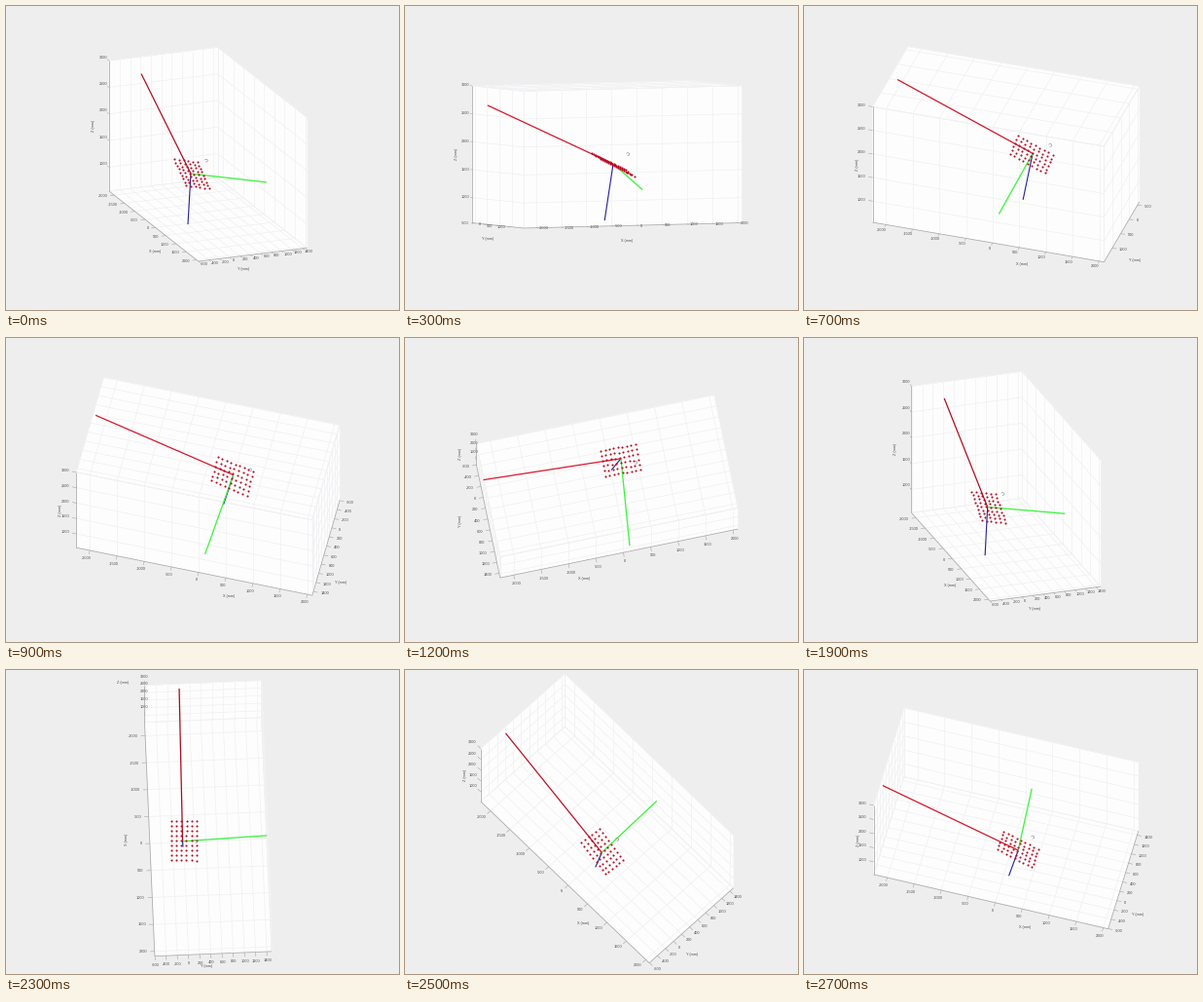
Animation, 404 px wide and 312 px high, one loop 2.8 s. Source, as a matplotlib script:

```python
import numpy as np
import matplotlib.pyplot as plt
from matplotlib.animation import FuncAnimation
from matplotlib.collections import LineCollection
from matplotlib.patches import Arc, Polygon

W, H, DPI = 404, 312, 100
FRAMES, STEP = 28, 100
PX = 72 / DPI                      # points per pixel
SCALE = 0.0575                     # pixels per millimetre
LO = np.array([-2250.0, -605.0, 550.0])
HI = np.array([2090.0, 1485.0, 3000.0])
MID = (LO + HI) / 2
SCREEN_MID = np.array([207.7, 152.2])

# camera drag: time (ms), azimuth, elevation (degrees)
VIEWS = np.array([
    (0, 68.4, 18.1), (700, -17.6, -32.6), (1200, 11.7, -81.2),
    (1500, 30.5, -15.6), (1900, 71.1, 22.6), (2300, 87.6, 74.3),
    (2400, 63, 71), (2700, 15, 59.8),
])

ORIGIN = np.array([271, -30, 1575])
RED_END = np.array([-2250, 15, 2679])
GREEN_END = np.array([117, 1485, 1184])
BLUE_END = np.array([94, -16, 568])
BOARD = np.array([-63, -216, 1768])
BOARD_U = np.array([645, -30, -296]) / 8
BOARD_V = np.array([-5, 450, -111]) / 5
DOTS = np.array([BOARD + i * BOARD_U + j * BOARD_V
                 for i in range(9) for j in range(6)])

INK, EDGE, GRID = "#4c4c4c", "#a9a9a9", "#f1f0f2"


def view_at(ms):
    """Cubic interpolation of azimuth and elevation."""
    t, v = VIEWS[:, 0], VIEWS[:, 1:]
    k = min(np.searchsorted(t, ms, side="right") - 1, len(t) - 2)

    def slope(i):
        a, b = max(i - 1, 0), min(i + 1, len(t) - 1)
        return (v[b] - v[a]) / (t[b] - t[a])

    h = t[k + 1] - t[k]
    u = (ms - t[k]) / h
    ease = u * u * (3 - 2 * u)
    return (v[k] + (v[k + 1] - v[k]) * ease
            + h * u * (1 - u) ** 2 * slope(k)
            - h * u * u * (1 - u) * slope(k + 1))


def view_matrix(az, el):
    """Rows give screen x and screen y (downwards) per unit of X, Y, Z."""
    ca, sa, ce, se = np.cos(az), np.sin(az), np.cos(el), np.sin(el)
    return np.array([[ca, sa, 0], [se * sa, -se * ca, -ce]])


def ticks(axis, length):
    if axis == 0:
        step = 500
    elif axis == 1:
        step = 200 if length > 85 else 500
    else:
        step = 500 if length > 30 else 1000
    first = np.ceil(LO[axis] / step) * step
    return np.arange(first, HI[axis] + 1, step)


fig = plt.figure(figsize=(W / DPI, H / DPI), dpi=DPI, facecolor="#eeeeee")
ax = fig.add_axes([0, 0, 1, 1])


def write(pos, text, rotation=0, size=3.9):
    ax.text(*pos, text, size=size * PX, color=INK, family="Liberation Sans",
            ha="center", va="center", rotation=rotation)


def segments(lines, color, width, z):
    ax.add_collection(LineCollection(lines, colors=color,
                                     linewidths=width * PX, zorder=z))


def title_place(axis, start, end, out, el):
    """Position and rotation of an axis title."""
    mid, d = (start + end) / 2, end - start
    if axis == 2:
        if el > np.radians(70):
            return mid + (-22, -22), 0
        return mid + (-16, 0), 90
    steep = abs(d[1]) / np.hypot(*d)
    if steep > 0.967 and out[0] < 0:
        return mid + (-24 if axis == 0 else -29, 0), 90
    down = d if d[1] > 0 else -d
    slide = 0.15 * min(1, 10 * abs(d[1]) / max(abs(d[0]), 1))
    if axis == 0:
        away = (14 * out[0] * abs(out[0]), 15 + 3.5 * abs(out[1]))
    else:
        away = (20 * out[0], 12 + 9 * steep)
    return mid + slide * down + away, 0


def draw_axis(axis, corner, out, proj, el):
    """Edge, ticks, numbers and title; out is the projected tick direction."""
    a, b = corner.copy(), corner.copy()
    a[axis], b[axis] = LO[axis], HI[axis]
    start, end = proj(a), proj(b)
    segments([(start, end)], EDGE, 0.75, 3)
    unit = out / max(np.hypot(*out), 1e-6)
    marks = []
    for value in ticks(axis, np.hypot(*(end - start))):
        p = corner.copy()
        p[axis] = value
        at = proj(p)
        marks.append((at, at + 4.5 * out))
        label = f"{value:.0f}" if value else "0"
        width = 3.9 * (0.556 * len(label) - 0.22 * (value < 0))
        write(at + 7.5 * out + unit * (width / 2, 1.8), label)
    segments(marks, EDGE, 0.6, 3)
    pos, rotation = title_place(axis, start, end, out, el)
    write(pos, "XYZ"[axis] + " (mm)", rotation, 3.8)


def draw_walls(far, proj, lengths):
    for fixed in range(3):
        i, j = [k for k in range(3) if k != fixed]

        def point(u, v):
            p = far.copy()
            p[i], p[j] = u, v
            return proj(p)

        wall = [point(LO[i], LO[j]), point(HI[i], LO[j]),
                point(HI[i], HI[j]), point(LO[i], HI[j])]
        ax.add_patch(Polygon(wall, facecolor="#fdfdfd", edgecolor="#fdfdfd",
                             linewidth=0.3, zorder=1))
        lines = [(point(u, LO[j]), point(u, HI[j]))
                 for u in [*ticks(i, lengths[i]), LO[i], HI[i]]]
        lines += [(point(LO[i], v), point(HI[i], v))
                  for v in [*ticks(j, lengths[j]), LO[j], HI[j]]]
        segments(lines, GRID, 0.7, 2)


def draw(frame):
    ax.clear()
    ax.set(xlim=(0, W), ylim=(H, 0))
    ax.axis("off")

    az_deg, el_deg = view_at(frame * STEP)
    az, el = np.radians((az_deg, el_deg))
    m = view_matrix(az, el)

    def proj(p):
        return SCREEN_MID + SCALE * (np.asarray(p) - MID) @ m.T

    lengths = SCALE * (HI - LO) * np.hypot(m[0], m[1])
    far = np.array([LO[0] if az > 0 else HI[0], HI[1],
                    LO[2] if el > 0 else HI[2]])
    draw_walls(far, proj, lengths)

    # floor axes lie on the lower edges, the height axis on the left one
    x_high, y_high = m[1, 0] > 0, m[1, 1] > 0
    x_side = HI[0] if x_high else LO[0]
    y_side = HI[1] if y_high else LO[1]
    left = np.array([LO[0], LO[1] if az > 0 else HI[1], LO[2]])
    draw_axis(0, np.array([LO[0], y_side, LO[2]]),
              m[:, 1] * (1 if y_high else -1), proj, el)
    draw_axis(1, np.array([x_side, LO[1], LO[2]]),
              m[:, 0] * (1 if x_high else -1), proj, el)
    if left[1] == y_side:
        z_out = -m[:, 0]
    else:
        z_out = m[:, 1] * (-1 if az > 0 else 1)
    draw_axis(2, left, z_out, proj, el)

    o, r = proj(ORIGIN), proj(RED_END)
    steep = abs(r[1] - o[1]) / np.hypot(*(r - o))
    red = np.array([0.87, 0.09, 0.17]) - steep ** 2 * np.array([0.2, 0.05, 0.04])
    segments([(o, proj(BLUE_END))], "#2a2596", 1.15, 4)
    segments([(o, proj(GREEN_END))], "#3df53d", 1.3, 4)
    segments([(o, r)], red, 1.25, 5)
    ax.plot(*proj(DOTS).T, "o", color="#b80a22", markersize=2.1 * PX,
            markeredgewidth=0, zorder=6)

    # rotate pointer follows the drag
    pointer = (243.4 - 0.55 * az_deg, 153 + 0.31 * el_deg)
    ax.add_patch(Arc(pointer, 3.2, 2.8, theta1=200, theta2=110,
                     color="#8a8a8a", linewidth=0.6 * PX, zorder=7))
    return []


anim = FuncAnimation(fig, draw, frames=FRAMES, interval=STEP,
                     init_func=lambda: [], repeat=True, repeat_delay=0)
plt.show()
```
